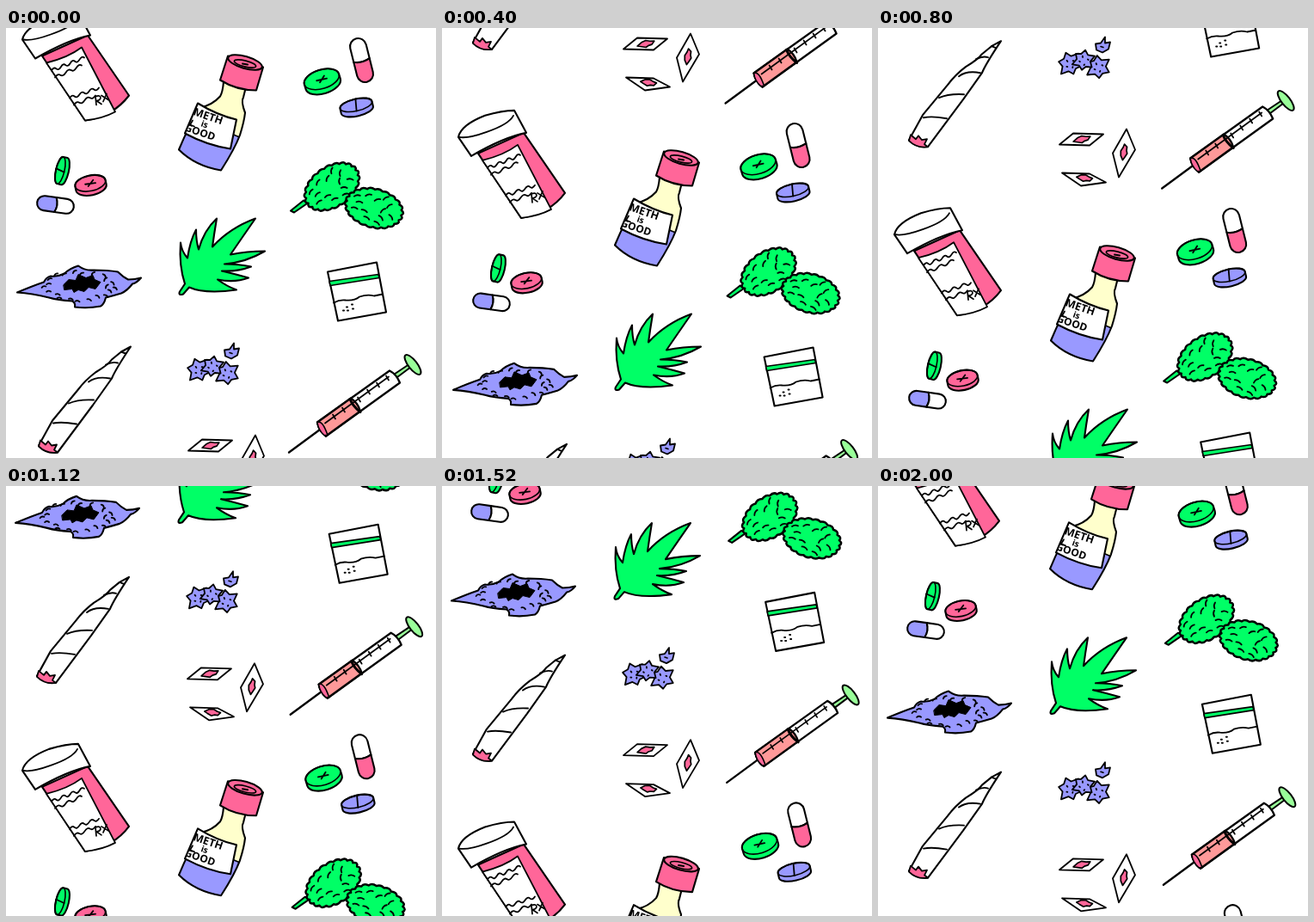
Animation of 500 by 500 pixels, one loop 2080 ms. Source, as an HTML page with a canvas:

```html
<!DOCTYPE html>
<html lang="en">
<head>
<meta charset="utf-8">
<title>Falling pattern</title>
<style>
html, body { margin: 0; width: 100%; height: 100%; overflow: hidden; background: #fff; }
canvas { display: block; width: 500px; height: 500px; }
</style>
</head>
<body>
<canvas id="stage" width="500" height="500"></canvas>
<script>
const ctx = document.getElementById('stage').getContext('2d');
const GREEN = '#00ff66', PINK = '#ff6699', BLUE = '#9999ff', RED = '#ff9999',
      CREAM = '#ffffcc', MINT = '#99ff99', WHITE = '#fff', BLACK = '#000';
const LOOP = 2080, STEP = 80, HOLD = 17;

function paint(path, fill, width = 2.1) {
  if (fill) { ctx.fillStyle = fill; ctx.fill(path); }
  if (width) { ctx.lineWidth = width; ctx.stroke(path); }
}
const draw = (d, fill, width) => paint(new Path2D(d), fill, width);

function at(x, y, deg, fn) {
  ctx.save();
  ctx.translate(x, y);
  ctx.rotate(deg * Math.PI / 180);
  fn();
  ctx.restore();
}

function clipTo(d, fn) {
  ctx.save();
  ctx.clip(new Path2D(d));
  fn();
  ctx.restore();
}

function ellipse(x, y, rx, ry, deg, fill, width) {
  const p = new Path2D();
  p.ellipse(x, y, rx, ry, deg * Math.PI / 180, 0, Math.PI * 2);
  paint(p, fill, width);
}

function tablet(x, y, rx, ry, thick, deg, color, cross) {
  at(x, y, deg, () => {
    const body = new Path2D();
    body.ellipse(0, 0, rx, ry, 0, Math.PI, Math.PI * 2);
    body.ellipse(0, thick, rx, ry, 0, 0, Math.PI);
    body.closePath();
    paint(body, color);
    ellipse(0, 0, rx, ry, 0, null, 1.6);
    draw(cross ? 'M-6 0L6 1M-3 3L4 -3' : `M1 ${-ry}L-1 ${ry}`, null, 1.8);
  });
}

function capsule(x, y, len, wide, deg, left, right) {
  const h = len / 2, r = wide / 2, k = h - r;
  at(x, y, deg, () => {
    draw(`M0 ${-r}H${-k}A${r} ${r} 0 0 0 ${-k} ${r}H0Q4 0 0 ${-r}Z`, left);
    draw(`M0 ${-r}H${k}A${r} ${r} 0 0 1 ${k} ${r}H0Q4 0 0 ${-r}Z`, right);
  });
}

// Short dashes spread over an ellipse between two relative radii
function marks(n, rx, ry, inner, outer, size) {
  for (let i = 0; i < n; i++) {
    const a = i * 2.4, r = inner + (outer - inner) * Math.sqrt((i + .5) / n);
    const x = Math.cos(a) * r * rx, y = Math.sin(a) * r * ry;
    at(x, y, (i * 67) % 110 - 55, () => draw(`M${-size} 0Q0 -2 ${size} 0`, null, 1.8));
  }
}

function wave(x1, y1, x2, y2, n) {
  const dx = (x2 - x1) / n, dy = (y2 - y1) / n;
  let d = `M${x1} ${y1}`;
  for (let i = 0; i < n; i++) d += `q${dx / 2} ${dy / 2 + (i % 2 ? 3.5 : -3.5)} ${dx} ${dy}`;
  draw(d, null, 1.8);
}

function bud(x, y, a, b, deg) {
  at(x, y, deg, () => {
    const n = 22, pt = (i, r) => {
      const t = i / n * Math.PI * 2;
      return `${Math.cos(t) * a * r} ${Math.sin(t) * b * r}`;
    };
    let d = 'M' + pt(0, .93);
    for (let i = 0; i < n; i++) d += `Q${pt(i + .5, 1.06)} ${pt(i + 1, .93)}`;
    draw(d + 'Z', GREEN, 2.5);
    marks(13, a, b, .2, .76, 3.5);
  });
}

function star(x, y, r, deg) {
  at(x, y, deg, () => {
    let d = '';
    for (let i = 0; i < 12; i++) {
      const t = i * Math.PI / 6, q = i % 2 ? r * .64 : r * (1 + .12 * Math.sin(i * 2));
      d += (i ? 'L' : 'M') + Math.cos(t) * q + ' ' + Math.sin(t) * q;
    }
    draw(d + 'Z', BLUE, 1.8);
    draw('M-4 -3l1 1M3 -4l1 0M-3 4l1 0M4 3l0 1', null, 1.8);
  });
}

function pillJar() {
  draw('M42 32L92 107Q125 102 143 78L95 8Z', PINK);
  draw('M47 40Q72 34 88 22L127 97Q112 105 92 107Z', WHITE, 1.8);
  wave(53, 49, 91, 34, 7);
  wave(57, 57, 88, 43, 5);
  wave(74, 81, 108, 69, 6);
  wave(79, 89, 104, 78, 4);
  draw('M105 89L104 79Q110 77 110 81Q109 84 105 84L111 88M113 85L117 76M111 78L119 83', null, 1.7);
  draw('M19 13Q22 -1 50 -12Q70 -18 84 -18L98 8Q72 13 34 35Z', WHITE);
  draw('M20 13Q30 15 52 7Q78 -2 83 -12', null, 1.8);
}

function smallPills() {
  tablet(63, 165, 16, 5, 5, -77, GREEN);
  tablet(98, 180, 18, 9, 5, -12, PINK, true);
  capsule(57.5, 205, 43, 17, 8, BLUE, WHITE);
}

function tar() {
  draw('M13 307Q32 299 44 295Q47 289 52 288Q60 289 68 285Q74 279 84 276Q92 282 102 281Q118 281 130 283Q136 289 142 292Q150 292 157 290Q152 296 147 297Q141 305 134 308Q124 311 116 313Q114 321 110 323Q95 326 80 324Q81 319 77 317Q60 316 50 313Q30 308 13 307Z', BLUE);
  at(85, 300, 0, () => marks(22, 45, 19, .68, .94, 2.5));
  draw('M67 298L73 292L81 293L84 286L93 290L101 287L103 292L110 295L104 303L96 301L91 306L84 304L79 307L77 303L68 304Z', BLACK, 1);
}

function joint() {
  draw('M145 370L134 376L123 385Q119 391 104 400Q92 409 83 421L54 456L38 485Q47 494 60 493L101 438L123 407Q127 397 145 370Z', WHITE);
  draw('M40 479L46 484L49 480L53 485L59 484L56 490L60 493Q47 495 38 486Z', PINK, 1.8);
  draw('M134 376L139 378M116 391Q124 387 130 389M96 411Q105 404 121 407M73 436Q84 431 102 432M55 459Q65 457 82 460', null, 1.9);
}

function vial() {
  const label = 'M223 87Q246 101 268 106L261 140Q234 136 208 122Z';
  const glass = 'M253 62Q252 74 249 79Q240 89 226 92Q213 112 201 141Q220 160 250 165Q266 140 272 124Q277 108 278 98Q273 85 276 80L279 68Z';
  draw(glass, CREAM, 0);
  clipTo(glass, () => draw('M190 118L209 122L261 122L280 130V175H190Z', BLUE, 1.6));
  draw(glass);
  draw(label, WHITE);
  clipTo(label, () => at(231, 111, 19, () => {
    ctx.fillStyle = BLACK;
    ctx.textAlign = 'center';
    const line = (text, x, y, size) => {
      ctx.font = `700 ${size}px "Open Sans", sans-serif`;
      ctx.fillText(text, x, y);
    };
    line('METH', 1, -5.5, 12.5);
    line('is', 0, 4, 10);
    line('GOOD', -2, 15, 12);
  }));
  draw('M217 107L214 112L219 114', null, 1.8);
  draw('M258 32L249 60Q268 72 291 72L299 45Z', PINK);
  ellipse(278, 39.5, 20.5, 7, 16, PINK);
  ellipse(278, 41, 13, 3.5, 14, null, 1.6);
  draw('M275 41L281 42', null, 2);
}

function leaf() {
  draw('M208 297Q201 276 203 249Q204 259 211 267Q214 247 221 234Q221 247 224 257Q230 235 245 221Q242 239 240 254Q260 232 290 221Q274 244 261 263Q280 259 301 259Q279 272 254 274Q271 274 285 277Q269 283 251 282Q268 286 282 290Q266 296 246 292Q257 300 268 304Q231 309 213 301L206 309Q200 311 202 306Z', GREEN);
}

function crystals() {
  star(224, 397, 14, 10);
  star(257, 401, 14, 25);
  star(240, 393, 12.5, 40);
  draw('M254 374L260 373L265 366L265 373L271 372L269 380L262 384L255 381Z', BLUE, 1.8);
  draw('M260 377l3 1', null, 1.6);
}

function blot(x, y, rx, deg) {
  at(x, y, deg, () => draw(`M${-rx} 2L-5 -2L0 -4L5 -3L${rx} -3L7 1L3 2L0 4L-5 3Z`, PINK, 1.7));
}

function papers() {
  draw('M212 491L228 478L263 479L247 492Z', WHITE, 1.8);
  blot(238, 485, 10, -3);
  draw('M290 473L300 497L281 529L274 501Z', WHITE, 1.8);
  blot(287, 500, 9, -68);
  draw('M215 524L247 525L266 535L237 539Z', WHITE, 1.8);
  blot(241, 530, 9, 20);
}

function bigPills() {
  capsule(413.5, 37, 52, 19, 76, WHITE, PINK);
  tablet(367, 59, 21, 11, 6, -17, GREEN, true);
  tablet(407, 89, 19, 7, 6, -13, BLUE);
}

function buds() {
  draw('M331 212L346 200L351 203L335 214Z', GREEN);
  bud(379, 184, 36, 24, -35);
  bud(428, 209, 35, 23, 15);
}

function bag() {
  draw('M374 283L431 272L442 330L386 340Z', WHITE);
  draw('M376 294L433 286L434 290L377 299Z', GREEN, 1.7);
  draw('M381 319Q388 315 395 316Q405 317 411 312Q420 309 428 311L438 309', null, 1.8);
  draw('M392 328h1M396 324h1M397 328h1M402 321h1M403 326h1', null, 2);
}

function syringe() {
  draw('M329 493L367 465', null, 2.3);
  draw('M450 403L471 389L473 392L453 407Z', MINT, 2);
  ellipse(473, 391, 5, 14, -38, MINT, 2);
  draw('M362 458L446 398Q454 402 458 412L372 474Q364 468 362 458Z', WHITE, 2.3);
  draw('M362 458L401 430Q409 435 412 445L372 474Q364 468 362 458Z', RED, 2.3);
  draw('M362 458Q368 455 374 473L370 473Q363 467 362 458Z', PINK, 1.6);
  draw('M371 459L445 405M380 449l3 5M391 441l3 5M409 429l3 5M420 420l3 5M431 412l3 5M442 404l3 5', null, 1.7);
  draw('M400 431Q403 439 412 446', null, 3);
}

const columns = [
  { items: [pillJar, smallPills, tar, joint], speed: 22.67, period: 582, drift: 0, shift: -2 },
  { items: [vial, leaf, crystals, papers], speed: 22.2, period: 578, drift: 0, shift: -1 },
  { items: [bigPills, buds, bag, syringe], speed: 19.8, period: 505, drift: .12, shift: 0 }
];

function render(ms) {
  const tick = Math.floor(ms % LOOP / STEP);
  const n = tick >= HOLD ? tick - 1 : tick;
  ctx.fillStyle = WHITE;
  ctx.fillRect(0, 0, 500, 500);
  ctx.strokeStyle = BLACK;
  ctx.lineJoin = ctx.lineCap = 'round';
  for (const c of columns) {
    for (let copy = 0; copy < 2; copy++) {
      at(n * c.drift + copy * c.shift, .5 + n * c.speed - copy * c.period, 0,
        () => c.items.forEach(item => item()));
    }
  }
}

const start = performance.now();
function loop() {
  render(performance.now() - start);
  requestAnimationFrame(loop);
}
loop();
</script>
</body>
</html>
```
